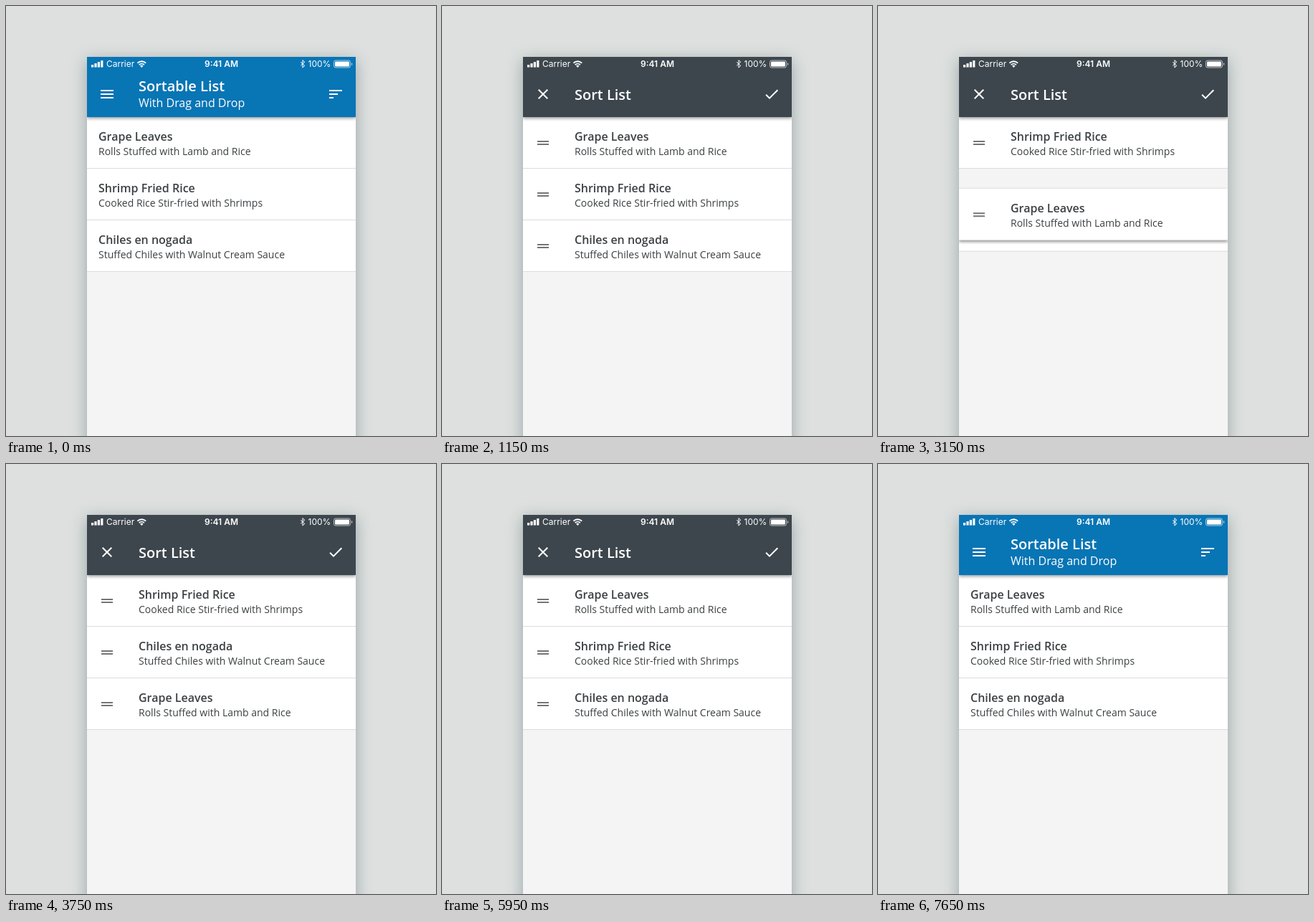
These frames come from a looping animation (600 by 600 pixels, 8000 ms). An HTML page:

```html
<!DOCTYPE html>
<html lang="en">
<head>
<meta charset="utf-8">
<title>Sortable list</title>
<style>
html, body { margin: 0; width: 100%; height: 100%; overflow: hidden; background: #dde0df; }
svg { display: block; width: 600px; height: 600px; }
text { font-family: "Open Sans", sans-serif; white-space: pre; }
.status text { font: 12px Inter, Roboto, sans-serif; }
.status .clock { font-weight: 600; }
.title { font-size: 20px; font-weight: 600; }
.sub { font-size: 16px; }
.row { fill: #3c4043; }
.name { font-size: 16px; font-weight: 600; }
.info { font-size: 14px; }
.phone { filter: drop-shadow(0 5px 11px rgba(60, 80, 88, .42)); }
.bar { filter: drop-shadow(0 2px 2px rgba(0, 0, 0, .38)); }
.lift { filter: drop-shadow(0 2px 2px rgba(0, 0, 0, .5)); }
</style>
</head>
<body>
<svg viewBox="0 0 600 600">
  <clipPath id="screen"><rect x="113" y="71" width="375" height="529"/></clipPath>
  <rect class="phone" x="113" y="71" width="375" height="580" fill="#f4f4f4"/>
  <g clip-path="url(#screen)">
    <g id="rows"></g>
    <rect id="bar" class="bar" x="113" y="71" width="375" height="84"/>
    <g fill="#fff">
      <g id="browse">
        <text class="title" x="185" y="119">Sortable List</text>
        <text class="sub" x="185" y="141">With Drag and Drop</text>
        <path transform="translate(129 111)" d="M3 6h18v2H3zM3 11h18v2H3zM3 16h18v2H3z"/>
        <path transform="translate(448 111)" d="M3 6h18v2H3zM3 11h12v2H3zM3 16h6v2H3z"/>
      </g>
      <g id="sort">
        <text class="title" x="185" y="131">Sort List</text>
        <path d="M134.7 116.7l12.6 12.6m0-12.6l-12.6 12.6M452.1 123.7l4.9 4.9 11.3-11.3" fill="none" stroke="#fff" stroke-width="2"/>
      </g>
      <g class="status">
        <path d="M119 82h3.2v3.5H119zM123.4 80h3.2v5.5h-3.2zM127.8 78h3.2v7.5h-3.2zM132.2 76h3.2v9.5h-3.2z"/>
        <text x="140" y="85">Carrier</text>
        <path d="M183.4 79.6a8.6 8.6 0 0 1 11.8 0M185.7 82a5.3 5.3 0 0 1 7.2 0" fill="none" stroke="#fff" stroke-width="1.9"/>
        <path d="M187.1 83.6a3.2 3.2 0 0 1 4.4 0l-2.2 2.4z"/>
        <text class="clock" x="300.5" y="85" text-anchor="middle">9:41 AM</text>
        <path d="M411.2 78.3l5.6 5-2.9 2.7V75.6l2.9 2.6-5.6 5" fill="none" stroke="#fff"/>
        <text x="421.5" y="85">100%</text>
        <rect x="457.5" y="76" width="23" height="10" rx="2.4" fill="none" stroke="#fff" stroke-opacity=".65"/>
        <rect x="459" y="77.5" width="20" height="7" rx="1.2"/>
        <path d="M482 79v4q1.3-.6 1.3-2t-1.3-2" opacity=".65"/>
      </g>
    </g>
  </g>
</svg>
<script>
const $ = id => document.getElementById(id);
const DISHES = [
  ["Chiles en nogada", "Stuffed Chiles with Walnut Cream Sauce"],
  ["Shrimp Fried Rice", "Cooked Rice Stir-fried with Shrimps"],
  ["Grape Leaves", "Rolls Stuffed with Lamb and Rice"]
];
const ROW = 72, BLUE = [8, 117, 181], DARK = [61, 70, 77];

// The dragged dish comes last so that it lies on top.
$("rows").innerHTML = DISHES.map(([name, info]) => `
  <g class="row">
    <rect class="lift" width="375" height="71.5" fill="#fff"/>
    <rect width="375" height="71" fill="#fff"/>
    <rect y="71" width="375" height="1" fill="#dcdcdc"/>
    <path class="handle" d="M20 33h16v2H20zM20 37h16v2H20z" fill="#757575"/>
    <g class="label">
      <text class="name" x="16" y="33">${name}</text>
      <text class="info" x="16" y="53">${info}</text>
    </g>
  </g>`).join("");
const [chiles, shrimp, grape] = document.querySelectorAll(".row");
const lifts = document.querySelectorAll(".lift");
const handles = document.querySelectorAll(".handle");
const labels = document.querySelectorAll(".label");

const clamp = (v, a, b) => Math.min(b, Math.max(a, v));
const ramp = (t, a, b) => clamp((t - a) / (b - a), 0, 1);
const ease = (t, a, b) => { const p = ramp(t, a, b); return p * p * (3 - 2 * p); };
const place = (row, y) => row.setAttribute("transform", `translate(113 ${155 + y})`);

function draw(t) {
  const mode = ease(t, 610, 1140) - ease(t, 7010, 7640);
  const shade = BLUE.map((c, i) => Math.round(c + (DARK[i] - c) * mode));
  $("bar").setAttribute("fill", `rgb(${shade})`);
  $("browse").setAttribute("opacity", 1 - mode);
  $("sort").setAttribute("opacity", mode);
  handles.forEach(h => h.setAttribute("opacity", mode));
  labels.forEach(l => l.setAttribute("transform", `translate(${56 * mode} 0)`));

  // One slot at a time, down and back up; neighbours give way equally.
  const drag = ROW * (ease(t, 2568, 2965) + ease(t, 2965, 3400)
    - ease(t, 5083, 5322) - ease(t, 5342, 5595));
  place(grape, drag);
  place(shrimp, ROW - clamp(drag, 0, ROW));
  place(chiles, 2 * ROW - clamp(drag - ROW, 0, ROW));

  const lift = ramp(t, 2020, 2350) - ramp(t, 3510, 3750)
    + ramp(t, 4610, 4750) - ramp(t, 5810, 5950);
  lifts.forEach((l, i) => l.setAttribute("opacity", i === 2 ? lift : 0));
}

const start = performance.now();
function tick() {
  draw((performance.now() - start) % 8000);
  requestAnimationFrame(tick);
}
tick();
</script>
</body>
</html>
```
